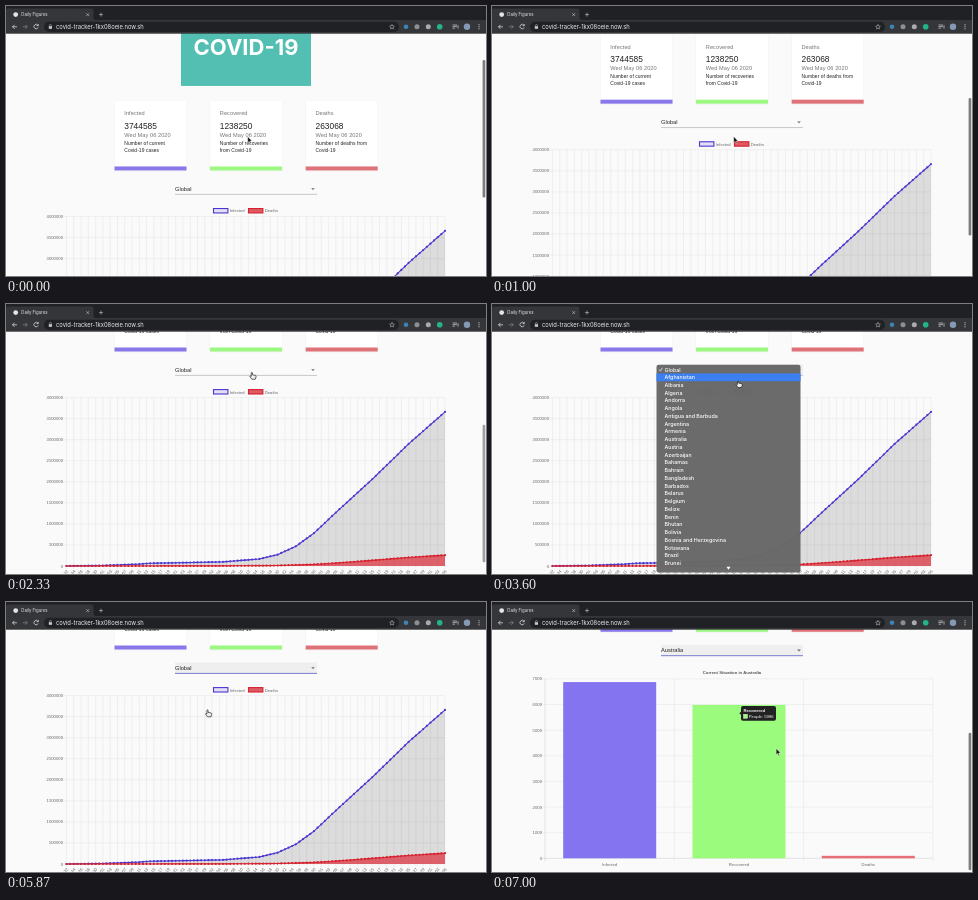
Animation of 480x270 px, one loop 7070 ms. Source, as an HTML page:

```html
<!DOCTYPE html>
<html lang="en">
<head>
<meta charset="utf-8">
<title>Daily Figures</title>
<style>
html, body { margin: 0; width: 100%; height: 100%; overflow: hidden; background: #fafafa; }
svg { display: block; width: 100vw; height: 100vh; font-family: "Liberation Sans", Arial, sans-serif; }
.ui { font-family: Inter, "Open Sans", sans-serif; }
</style>
</head>
<body>
<svg id="stage" viewBox="0 0 480 270"></svg>
<script>
const LOOP = 7070, ROW = 7.74;
const BLUE = '#4a36d0', RED = '#d5222e';
const countries = ('Global,Afghanistan,Albania,Algeria,Andorra,Angola,Antigua and Barbuda,Argentina,Armenia,' +
  'Australia,Austria,Azerbaijan,Bahamas,Bahrain,Bangladesh,Barbados,Belarus,Belgium,Belize,Benin,Bhutan,' +
  'Bolivia,Bosnia and Herzegovina,Botswana,Brazil,Brunei,Bulgaria,Burkina Faso,Burma').split(',');

// Linear interpolation through [position, value] pairs
function track(t, keys) {
  if (t <= keys[0][0]) return keys[0][1];
  for (let i = 1; i < keys.length; i++) {
    const [a, v] = keys[i - 1], [b, w] = keys[i];
    if (t <= b) return v + (w - v) * (t - a) / (b - a);
  }
  return keys[keys.length - 1][1];
}
const range = (n, f) => Array.from({ length: n }, (_, i) => f(i)).join('');
const rect = (x, y, w, h, fill, more = '') =>
  `<rect x="${x}" y="${y}" width="${w}" height="${h}" fill="${fill}" ${more}/>`;
const dot = (x, y, r, fill) => `<circle cx="${x}" cy="${y}" r="${r}" fill="${fill}"/>`;
const path = (d, stroke, width, more = '') =>
  `<path d="${d}" fill="none" stroke="${stroke}" stroke-width="${width}" ${more}/>`;
// Text vertically centred on y
const text = (x, y, str, size, fill, more = '') =>
  `<text x="${x}" y="${y + size * .36}" font-size="${size}" fill="${fill}" ${more}>${str}</text>`;
const END = 'text-anchor="end"', MID = 'text-anchor="middle"';

function card(x, title, count, lines, color) {
  const tx = x + 9.8;
  return rect(x - .3, 95, 72.6, 70.3, '#000', 'opacity=".06" rx="1.5"') +
    rect(x, 95, 72, 69.5, '#fff', 'rx="1.3"') + rect(x, 160.5, 72, 4, color) +
    text(tx, 107.5, title, 5.65, '#757575', 'letter-spacing=".05"') +
    text(tx, 120, count, 8.4, '#222') +
    text(tx, 129, 'Wed May 06 2020', 5.65, '#757575', 'letter-spacing=".05"') +
    text(tx, 137.2, lines[0], 4.95, '#222', 'letter-spacing=".05"') +
    text(tx, 144.4, lines[1], 4.95, '#222', 'letter-spacing=".05"');
}

function lineChart() {
  const x = d => 60.5 + d * 378.5 / 104, y = m => 379 - m * 42.1;
  const infected = [[0, 0], [10, .012], [20, .045], [23, .065], [32, .079], [43, .098], [53, .167], [58, .27],
    [63, .467], [68, .78], [74, 1.27], [84, 2.06], [94, 2.9], [104, 3.66]];
  const deaths = [[0, 0], [43, .003], [58, .011], [68, .038], [74, .069], [84, .134], [94, .203], [104, .257]];
  const series = (keys, color, fill) => {
    const pts = Array.from({ length: 105 }, (_, d) => `${x(d).toFixed(2)} ${y(track(d, keys)).toFixed(2)}`);
    const line = 'M' + pts.join('L');
    return `<path d="${line}V379H60.5Z" fill="${fill}"/>` + path(line, color, 1.1) +
      path(pts.map(p => `M${p}h0`).join(''), color, 2.2, 'stroke-linecap="round"');
  };
  const legend = (lx, name, color, fill) =>
    rect(lx, 202.6, 14.4, 4.4, fill, `stroke="${color}" stroke-width="1.1"`) +
    text(lx + 16.2, 205, name, 4.24, '#666');
  return legend(207.5, 'Infected', BLUE, '#e2dff2') + legend(242.5, 'Deaths', RED, '#dd5a64') +
    range(53, i => path(`M${x(i * 2)} 210.5V382.5`, '#dedede', .4)) +
    range(9, i => path(`M57 ${y(i / 2)}H439`, '#dedede', .4) +
      text(57, y(i / 2), i * 500000, 4.24, '#666', END)) +
    series(infected, BLUE, 'rgba(0,0,0,.12)') + series(deaths, RED, 'rgba(222,50,65,.72)') +
    range(53, i => {
      const date = new Date(Date.UTC(2020, 0, 22 + i * 2)).toISOString().slice(0, 10);
      return `<g transform="translate(${x(i * 2) + .8} 383.5) rotate(-50)">${text(0, 0, date, 4.24, '#666', END)}</g>`;
    });
}

const bars = [['Infected', 6875, '#8474f0'], ['Recovered', 5986, '#9bfb7d'], ['Deaths', 97, '#e86f76']];
const barScale = .02563, barBase = 391;
function barChart() {
  return text(240, 205.5, 'Current Situation in Australia', 4.24, '#555', MID + ' font-weight="700"') +
    range(8, i => {
      const y = barBase - i * 1000 * barScale;
      return path(`M50 ${y}H441`, i ? '#dedede' : '#bbb', .4) + text(50, y, i * 1000, 4.24, '#666', END);
    }) +
    range(4, i => path(`M${53 + i * 129.3} 211.6V394`, i ? '#dedede' : '#bbb', .4)) +
    bars.map(([name, , color], i) =>
      rect(71.2 + i * 129.3, barBase, 93, 0, color, 'class="bar"') +
      text(117.7 + i * 129.3, 397, name, 4.24, '#666', MID)).join('') +
    `<g id="tip"><path d="M247.3 246l2-1.8v3.6z" fill="#222"/>` +
    rect(249, 238.7, 35, 14.8, '#222', 'rx="2"') +
    text(251.5, 243, 'Recovered', 4.24, '#fff', 'font-weight="700"') +
    rect(251.5, 247, 4, 4, '#9bfb7d', 'stroke="#fff" stroke-width=".4"') +
    text(256.8, 249, 'People: 5986', 4.24, '#fff') + '</g>';
}

function browserBar() {
  const grey = '#c8cacd', ui = 'class="ui"';
  return rect(0, 0, 480, 15, '#202124') + rect(0, 14, 480, 13.7, '#35363a') +
    '<path d="M0 14V4Q0 2.5 2 2.5H85Q87.5 2.5 87.5 5V11.5Q87.5 14 90 14Z" fill="#35363a"/>' +
    dot(9.7, 8.6, 2.4, '#e4e5e7') + text(15.3, 8.6, 'Daily Figures', 4.3, '#e8eaed', ui) +
    path('M80.3 7.2l2.8 2.8m0-2.8l-2.8 2.8M93 8.6h4m-2-2v4', grey, .6) +
    path('M11 20.8H6.5m2-2l-2 2l2 2', '#e8eaed', .7) + path('M16.8 20.8h4.5m-2-2l2 2l-2 2', '#85878a', .7) +
    path('M32 19.4A2.2 2.2 0 1 0 32.2 21.4M32.3 18v1.7h-1.7', '#e8eaed', .7) +
    rect(38, 15.7, 355, 10.3, '#202124', 'rx="5.1"') +
    rect(42.8, 20.2, 3.2, 2.6, grey) + path('M43.4 20.3v-.8a1 1 0 0 1 2 0v.8', grey, .5) +
    text(50, 20.8, 'covid-tracker-1kx08oeie.now.sh', 5.8, '#e8eaed', ui) +
    path('M386 18.4l.7 1.6 1.7.2-1.3 1.1.4 1.7-1.5-.9-1.5.9.4-1.7-1.3-1.1 1.7-.2z', grey, .5) +
    dot(400, 20.8, 2.3, '#3f82b5') + dot(411, 20.8, 2.5, '#8d8f92') + dot(422.3, 20.8, 2.5, '#a9abad') +
    dot(433.7, 20.8, 2.8, '#23b486') +
    path('M446.5 19h4.5m-4.5 1.6h4.5m-4.5 1.6h2.5m3-3v3.5', '#e8eaed', .6) +
    dot(461, 20.8, 3.2, '#8399b5') +
    [18.8, 20.8, 22.8].map(y => dot(473, y, .55, '#e8eaed')).join('');
}

const stage = document.getElementById('stage');
stage.innerHTML = rect(0, 0, 480, 270, '#fafafa') + '<g id="page">' +
  rect(175, -40, 130, 120, '#53bfb2') +
  text(240, 41.2, 'COVID-19', 22, '#fff', 'class="ui" font-weight="700" ' + MID) +
  card(108.5, 'Infected', '3744585', ['Number of current', 'Covid-19 cases'], '#8878ea') +
  card(204, 'Recovered', '1238250', ['Number of recoveries', 'from Covid-19'], '#9bf880') +
  card(299.7, 'Deaths', '263068', ['Number of deaths from', 'Covid-19'], '#df7278') +
  rect(169, 177.5, 142, 11, '#efefef', 'id="focus"') +
  text(169, 182.8, 'Global', 5.7, '#222', 'id="choice"') +
  '<path d="M305.2 182.3h3.6l-1.8 1.8z" fill="#666"/><path id="underline" d="M169 188.4H311"/>' +
  `<g id="lines">${lineChart()}</g><g id="bars">${barChart()}</g></g>` +
  rect(476.6, 54, 2.7, 137.5, '#7d7d7d', 'id="thumb" rx="1.3"') + browserBar() +
  '<g id="menu">' + rect(164.5, 0, 144, 208, '#696969', 'id="panel" rx="2" opacity=".98"') +
  rect(164.5, 0, 144, ROW, '#3b7ff0', 'id="hover"') + '<g id="items" class="ui">' +
  path('M167.2 0l1.2 1.5 2-3.3', '#fff', .7) +
  countries.map((c, i) => text(172.5, i * ROW, c, 5.3, '#fff', 'class="item" font-weight="500"')).join('') +
  '</g><path d="M234.5 262.8h4l-2 3z" fill="#fff"/></g>' +
  '<g id="cursor"><path id="arrow" d="M0 0V6.2L1.5 4.9 2.5 7.2 3.4 6.8 2.4 4.6H4.3Z" fill="#111" stroke="#fff" stroke-width=".4"/>' +
  '<path id="hand" d="M-.6.5Q0-.5.6.5V2.6L3.8 3.2Q4.4 3.5 4.2 4.6L3.5 7H0L-2 4.2Q-2 3.3-.6 4Z" fill="#eee" stroke="#222" stroke-width=".7"/></g>';

const el = id => document.getElementById(id);
const set = (node, attrs) => { for (const k in attrs) node.setAttribute(k, attrs[k]); };
const show = (id, on) => set(el(id), { visibility: on ? 'visible' : 'hidden' });
const barNodes = document.querySelectorAll('.bar'), itemNodes = document.querySelectorAll('.item');

function draw(t) {
  const scroll = track(t, [[0, 0], [600, 34.5], [1400, 99], [2000, 117], [6250, 117], [6700, 134.7]]);
  set(el('page'), { transform: `translate(0 ${-scroll})` });
  set(el('thumb'), { y: 54 + scroll * .57, opacity: track(t, [[2270, 1], [2500, 0], [6180, 0], [6250, 1]]) });

  const picked = t >= 5930, swapped = t >= 6030, focused = t >= 2600;
  el('choice').textContent = picked ? 'Australia' : 'Global';
  show('focus', focused);
  set(el('underline'), { stroke: t >= 5600 ? '#5660c4' : '#8a8a8a', 'stroke-width': t >= 5600 ? .8 : .45 });
  show('lines', !swapped);
  show('bars', swapped);
  show('tip', t >= 6800);
  const grow = 1 - (1 - track(t, [[6030, 0], [7030, 1]])) ** 4;
  bars.forEach(([, value], i) => {
    const h = value * barScale * grow;
    set(barNodes[i], { y: barBase - h, height: h });
  });

  const cx = track(t, [[1800, 241.7], [2350, 246], [3930, 246], [4600, 202.5], [5000, 202.3], [5400, 201.5],
    [6200, 201.5], [6800, 284.2]]);
  const cy = track(t, [[1800, 130.5], [2350, 66], [3200, 66], [3500, 76.5], [3930, 76.5], [4600, 98], [5000, 105.5],
    [5330, 107.8], [6200, 107.8], [6800, 146.5]]);
  set(el('cursor'), { transform: `translate(${cx} ${cy})` });
  const pointing = t > 2300 && t < 6250;
  show('hand', pointing);
  show('arrow', !pointing);

  const top = track(t, [[3930, 60.8], [4400, 35.2]]), first = top + 4.8;
  const row = Math.max(0, Math.round((cy - first) / ROW));
  set(el('menu'), { opacity: t < 2600 ? 0 : track(t, [[5650, 1], [5850, 0]]) });
  set(el('panel'), { y: top, height: 268.6 - top });
  set(el('hover'), { y: first + (row - .5) * ROW });
  set(el('items'), { transform: `translate(0 ${first})` });
  itemNodes.forEach((n, i) => set(n, { visibility: first + i * ROW < 261 ? 'inherit' : 'hidden' }));
}

function frame() {
  draw(performance.now() % LOOP);
  requestAnimationFrame(frame);
}
frame();
</script>
</body>
</html>
```
